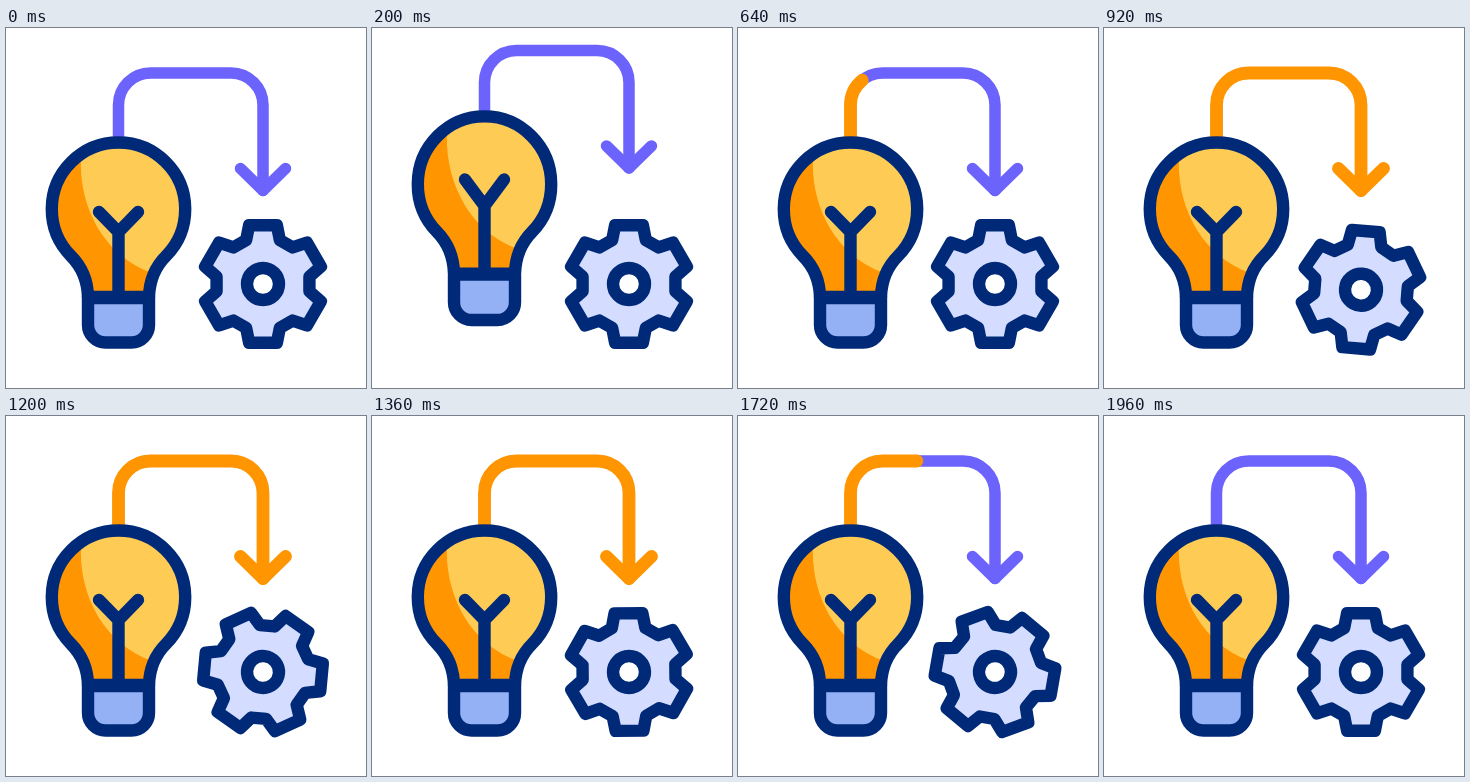
Recreate the animation shown at these times as an HTML page. Size 360x360 px, loop 2000 ms.

```html
<!DOCTYPE html>
<html lang="en">
<head>
<meta charset="utf-8">
<title>Idea to process</title>
<style>
  html, body { margin: 0; width: 100%; height: 100%; overflow: hidden; background: #fff; }
  svg { display: block; width: 100vw; height: 100vh; fill: none; stroke-linecap: round; stroke-linejoin: round; }
  .navy { stroke: #002a78; stroke-width: 12.4; }
  .purple { stroke: #6b63fc; stroke-width: 11.5; }
  .orange { stroke: #ff9500; stroke-width: 12.8; }
  .steady { vector-effect: non-scaling-stroke; }
</style>
</head>
<body>
<svg viewBox="0 0 360 360">
  <defs>
    <path id="glass" class="steady" d="M82 269C81.500 250 75 238 65 228A66.700 66.700 0 1 1 160 228C150 238 143.500 250 143 269Z"/>
    <path id="line" pathLength="1" d="M112.500 120V77A32 32 0 0 1 144.500 45H225A32 32 0 0 1 257 77V162"/>
    <path id="barb" pathLength="1" d="M257 162.500L234.500 140.500"/>
    <clipPath id="inside"><use href="#glass"/></clipPath>
  </defs>
  <g id="jump">
    <g class="purple">
      <use href="#line"/>
      <use href="#barb"/>
      <use href="#barb" transform="matrix(-1 0 0 1 514 0)"/>
    </g>
    <g class="orange">
      <use id="flow" href="#line"/>
      <g id="head">
        <use href="#barb"/>
        <use href="#barb" transform="matrix(-1 0 0 1 514 0)"/>
      </g>
    </g>
    <g id="bulb">
      <use href="#glass" fill="#fecb55"/>
      <path clip-path="url(#inside)" fill="#ff9500" d="M78 108C66 160 88 224 146 245V275H30V108Z"/>
      <path class="navy steady" fill="#93b1f4" d="M82 270H143V297A17.500 17.500 0 0 1 125.500 314.500H99.500A17.500 17.500 0 0 1 82 297Z"/>
      <use href="#glass" class="navy"/>
    </g>
    <path id="filament" class="navy"/>
  </g>
  <g id="gear" class="navy">
    <path id="teeth" fill="#d4ddff"/>
    <circle r="16" fill="#fff"/>
  </g>
</svg>
<script>
const LOOP = 2000;
const $ = id => document.getElementById(id);
const progress = (t, from, to) => Math.min(1, Math.max(0, (t - from) / (to - from)));

function rise(t, from, to) {
  const u = progress(t, from, to);
  return u * u * (3 - 2 * u);
}

const bump = (t, from, peak, to) => rise(t, from, peak) - rise(t, peak, to);

// Six teeth, each narrowing from its root to its tip.
function gearPath(count, root, tip) {
  const point = (r, degrees) => {
    const a = degrees * Math.PI / 180;
    return `${r * Math.sin(a)} ${-r * Math.cos(a)}`;
  };
  const corners = Array.from({ length: count }, (_, i) => {
    const a = i * 360 / count;
    return [point(root, a - 21), point(tip, a - 13.3), point(tip, a + 13.3), point(root, a + 21)].join('L');
  });
  return `M${corners.join('L')}Z`;
}

function trim(part, amount) {
  part.style.visibility = amount > 0.001 ? 'visible' : 'hidden';
  part.style.strokeDasharray = `${amount} 2`;
}

function draw(t) {
  const hop = bump(t, 40, 240, 380);
  const squash = bump(t, 280, 400, 560);
  $('jump').setAttribute('transform', `translate(0 ${-25 * hop})`);

  const stretch = 1 + 0.02 * hop - 0.05 * squash;
  $('bulb').setAttribute('transform', `translate(0 ${315 * (1 - stretch)}) scale(1 ${stretch})`);

  const arms = 184 - 11 * hop + 14 * squash;
  const fork = 204 - 4 * hop + 13 * squash;
  $('filament').setAttribute('d', `M93 ${arms}L112.5 ${fork}L132 ${arms}M112.5 ${fork}V268`);

  trim($('flow'), rise(t, 560, 820) - rise(t, 1520, 1880));
  trim($('head'), rise(t, 800, 900) - rise(t, 1420, 1520));

  const push = 8.5 * bump(t, 780, 860, 1020);
  const turn = 180 * (1 - Math.cos(Math.PI * progress(t, 846, 1878)));
  $('gear').setAttribute('transform', `translate(257 ${256 + push}) rotate(${turn})`);
}

$('teeth').setAttribute('d', gearPath(6, 47, 60.4));
const start = performance.now();
function tick() {
  draw((performance.now() - start) % LOOP);
  requestAnimationFrame(tick);
}
tick();
</script>
</body>
</html>
```
